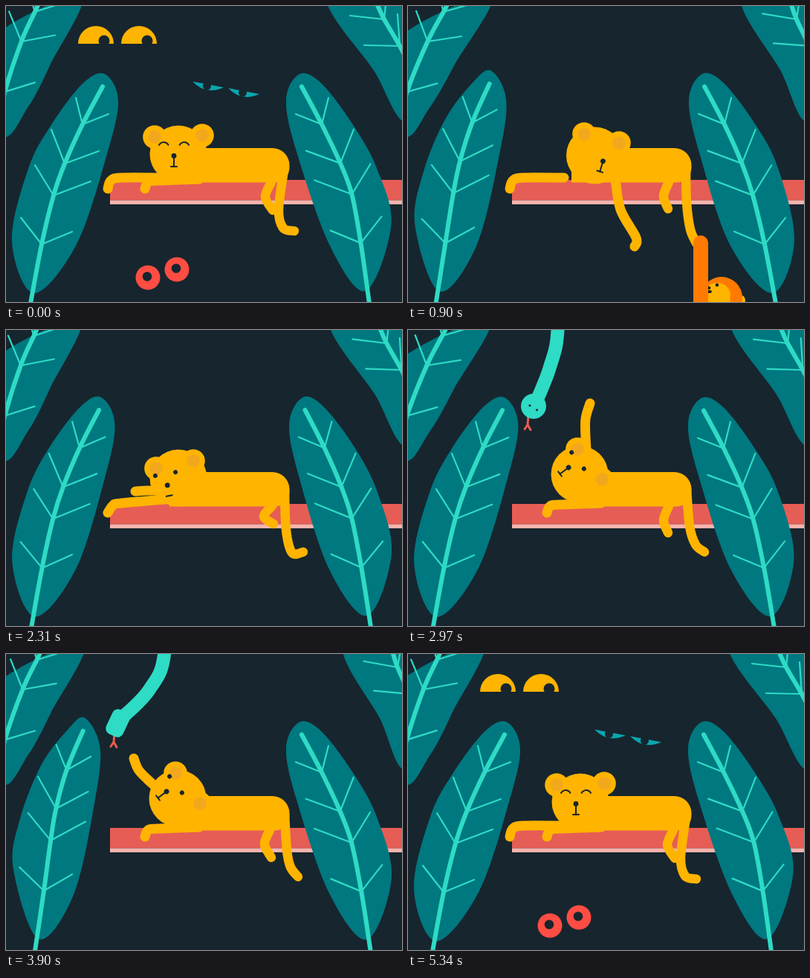
Recreate the animation shown at these times as an HTML page with a canvas. Size 533 px wide and 400 px high, loop 5370 ms.

```html
<!DOCTYPE html>
<html lang="en">
<head>
<meta charset="utf-8">
<title>Sleepy cat on a branch</title>
<style>
html, body { margin: 0; width: 100%; height: 100%; overflow: hidden; background: #17252e; }
canvas { display: block; }
</style>
</head>
<body>
<canvas id="stage" width="533" height="400"></canvas>
<script>
const g = document.getElementById('stage').getContext('2d');
const LOOP = 5370;
const BG = '#17252e', CAT = '#ffb400', EAR = '#f2a81d', LEAF = '#007880', VEIN = '#2edbc5',
  RED = '#e65d55', PALE = '#f8b3ae', EYE_RED = '#ff4d43', EYE_TEAL = '#0aa5ae', MONKEY = '#ff7a00';

// Numbers or arrays of the same form
const mix = (a, b, k) => Array.isArray(a) ? a.map((v, i) => mix(v, b[i], k)) : a + (b - a) * k;
const ease = k => k * k * (3 - 2 * k);

// keys: [[time, value], ...], eased between neighbours
function track(t, keys) {
  const i = keys.findIndex(k => k[0] > t);
  if (i < 0) return keys[keys.length - 1][1];
  if (!i) return keys[0][1];
  const [t0, a] = keys[i - 1], [t1, b] = keys[i];
  return mix(a, b, ease((t - t0) / (t1 - t0)));
}

// Smooth path through flat x, y points
function curve(p, closed) {
  const n = p.length / 2;
  const at = i => {
    const j = closed ? (i + n) % n : Math.min(n - 1, Math.max(0, i));
    return [p[2 * j], p[2 * j + 1]];
  };
  g.beginPath();
  g.moveTo(p[0], p[1]);
  for (let i = 0; i < (closed ? n : n - 1); i++) {
    const [a, b, c, d] = [at(i - 1), at(i), at(i + 1), at(i + 2)];
    g.bezierCurveTo(b[0] + (c[0] - a[0]) / 6, b[1] + (c[1] - a[1]) / 6,
      c[0] - (d[0] - b[0]) / 6, c[1] - (d[1] - b[1]) / 6, ...c);
  }
}
function stroke(color, width) {
  g.strokeStyle = color;
  g.lineWidth = width;
  g.stroke();
}
function fill(color) {
  g.fillStyle = color;
  g.fill();
}
function limb(p, color = CAT, width = 13) { curve(p); stroke(color, width); }
function line(color, width, ...p) {
  g.beginPath();
  for (let i = 0; i < p.length; i += 2) g.lineTo(p[i], p[i + 1]);
  stroke(color, width);
}
function dot(x, y, r, color, ry = r) {
  g.beginPath();
  g.ellipse(x, y, r, ry, 0, 0, 7);
  fill(color);
}
function within(x, y, deg, draw, sx = 1, sy = 1) {
  g.save();
  g.translate(x, y);
  g.rotate(deg * Math.PI / 180);
  g.scale(sx, sy);
  draw();
  g.restore();
}

// ---- Leaves: edge, rib, and a pair of veins at each inner rib point
const tall = {
  edge: [133,92, 151,128, 136,200, 95,322, 38,388, 8,318, 30,220, 60,162, 103,105],
  rib: [130,109, 103,160, 79,213, 64,256, 48,322, 33,402],
  veins: [[-9,-36, 35,-14], [-18,-46, 46,-17], [-25,-41, 50,-19], [-28,-36, 41,-17]]
};
const bent = {
  edge: [105,86, 126,126, 119,200, 91,325, 44,385, 10,290, 18,225, 47,150, 82,103],
  rib: [103,104, 81,157, 67,209, 60,252, 51,320, 39,402]
};
const topLeft = {
  edge: [90,-15, 56,80, 30,136, -5,174, -40,60],
  rib: [40,-18, 30,8, 15,48, -2,116, -8,150],
  veins: [[-10,-30, 36,-13], [-18,-40, 45,-10], [-18,-26, 40,-14]]
};
const topRight = {
  edge: [434,-18, 495,87, 545,155, 600,0],
  rib: [498,-6, 509,18, 530,54, 548,90],
  veins: [[3,-30, -46,-5], [-3,-43, -48,-1]]
};

function leaf(edge, rib, veins, turn) {
  curve(edge, true);
  fill(LEAF);
  veins.forEach(([lx, ly, rx, ry], i) =>
    within(rib[2 * i + 2], rib[2 * i + 3], turn, () => line(VEIN, 2.2, lx, ly, 0, 0, rx, ry)));
  limb(rib, VEIN, 6);
}

// The tip bends by `tip`, the foot by `foot`
function tallLeaf(tip, foot) {
  const bend = part => tall[part].map((v, i, p) => {
    const low = Math.min(1, Math.max(0, (p[i | 1] - 200) / 150));
    return mix(v, bent[part][i], mix(tip, foot, low));
  });
  leaf(bend('edge'), bend('rib'), tall.veins, -8 * tip);
}

// Hanging leaf, pushed sideways at the top of the stage and fixed at `still`
function topLeaf({ edge, rib, veins }, push, still) {
  const shear = p => p.map((v, i) => i % 2 ? v : v + push * Math.max(0, 1 - p[i + 1] / still));
  leaf(shear(edge), shear(rib), veins, push / 5);
}

function leaves(t) {
  const sway = (1 - Math.cos(4 * Math.PI * t / LOOP)) / 2;
  const hang = track(t, [[0, .5], [900, 1], [1710, 0], [2970, .9], [3900, .65], [4710, 1], [LOOP, .5]]);
  topLeaf(topLeft, 19 * hang, 120);
  topLeaf(topRight, 21 * sway, 145);
  tallLeaf(sway, sway);
  within(528, 0, 0, () => tallLeaf(
    track(t, [[0, 0], [900, .04], [1650, .97], [1800, .93], [2500, 0]]),
    track(t, [[0, 1], [900, 0], [1710, .9], [2970, .35], [3900, .7], [4710, 0], [LOOP, 1]])), -1);
}

// ---- Eyes in the dark
function watchers(t) {
  const open = track(t, [[300, 1], [450, 0], [4350, 0], [4550, 1]]);
  if (open < .01) return;
  const blink = (x, y, draw) => within(x, y, 0, draw, 1, open);
  for (const x of [121, 179]) blink(x, 51, () => {
    g.beginPath();
    g.arc(0, 0, 24, Math.PI, 0);
    fill(CAT);
    dot(11, -4, 7.5, BG);
  });
  for (const i of [0, 1]) blink(251 + 48 * i, 102 + 9 * i, () => {
    g.beginPath();
    g.moveTo(0, 0);
    g.lineTo(42, 8);
    g.quadraticCurveTo(18, 19, 0, 0);
    fill(EYE_TEAL);
    dot(19.5, 6, 5.5, BG);
  });
  for (const i of [0, 1]) blink(191 + 39 * i, 367 - 11 * i, () => {
    dot(0, 0, 16.5, EYE_RED);
    dot(-1, -1.5, 6.3, BG);
  });
}

// ---- Cat poses; face is [x, y, degrees] of the point between the eyes
const sleep = {
  head: [232, 200], face: [226, 187, 0], ears: [200, 177, 264, 175],
  armL: [210,232, 155,232, 141,236, 137,247],
  armR: [260,234, 203,236, 191,238, 187,247],
  leg: [357,238, 349,258, 359,276],
  tail: [375,215, 367,275, 373,300, 388,304]
};
const yawn = { ...sleep,
  leg: [351,238, 344,257, 350,274],
  tail: [375,215, 378,265, 386,294, 403,300]
};
const roll = { ...yawn,
  head: [251.5, 202], face: [267, 195, 17], ears: [237, 173, 284, 185],
  armR: [279,233, 286,275, 307,313, 305,325],
  tail: [374,215, 375,265, 380,302, 389,322]
};
const tug = { ...roll, tail: [374,215, 377,270, 383,312, 393,345] };
const wake = { ...sleep,
  face: [214.5, 194.5, -10], ears: [202, 187, 252, 177],
  armL: [225,228, 155,234, 144,237, 137,247],
  armR: [240,217, 210,217, 190,217, 174,218],
  leg: [358,238, 347,252, 360,262],
  tail: [375,215, 377,270, 385,301, 400,300]
};
const reach = { ...yawn,
  head: [231, 195], face: [228.5, 176.5, 53], ears: [228, 161, 261, 202],
  armL: [241,175, 239,145, 239,120, 245,99],
  tail: [375,215, 379,265, 387,290, 399,300]
};
const swat = { ...reach,
  armL: [210,187, 190,169, 178,156, 172,141],
  leg: [355,238, 348,257, 357,275],
  tail: [375,215, 378,265, 383,288, 393,301]
};
const acts = [[0, sleep], [350, sleep], [750, roll], [1000, roll], [1180, tug], [1500, wake], [2400, wake],
  [2800, reach], [3250, reach], [3650, swat], [3950, swat], [4450, yawn], [4850, yawn], [5310, sleep]];
const pose = (t, part) => track(t, acts.map(([at, p]) => [at, p[part]]));

function cat(t) {
  const ears = pose(t, 'ears');
  limb(pose(t, 'leg'), CAT, 12.5);
  limb(pose(t, 'tail'), CAT, 12.5);
  g.beginPath();
  g.roundRect(220, 192, 161.5, 46.5, [0, 23, 20, 0]);
  fill(CAT);
  limb(pose(t, 'armL'));
  dot(...pose(t, 'head'), 38.5, CAT);
  limb(pose(t, 'armR'));
  for (const i of [0, 2]) dot(ears[i], ears[i + 1], 15.8, CAT);
  for (const i of [0, 2]) dot(ears[i], ears[i + 1], 8.8, EAR);
  within(...pose(t, 'face'), () => face(t));
}

function face(t) {
  const gape = track(t, [[4350, 0], [4600, 1], [4850, 1], [5050, 0]]);
  const shut = t < 450 || t >= 4980;
  if (shut || t >= 1250) for (const x of [-13.8, 13.8]) {
    if (shut) {
      g.beginPath();
      g.arc(x, 4, 7, Math.PI * 1.15, Math.PI * 1.85);
      stroke(BG, 2);
    } else dot(x, 0, 3, BG);
  }
  dot(0, 15.5, 3.4, BG);
  g.globalAlpha = track(t, [[1250, 1], [1450, 0], [2450, 0], [2600, 1]]);
  line(BG, 2, 0, 16, 0, 30 - 5 * gape);
  g.globalAlpha = 1;
  if (gape > .05) dot(0, 30.5, 4 + 3 * gape, BG, 6 * gape);
  else line(BG, 2, -4, 30, 4, 30);
}

// ---- Visitors
function monkey(t) {
  const y = track(t, [[560, 100], [870, 0], [1000, 0], [1180, 24], [1480, 110]]);
  if (y >= 100) return;
  within(0, y, 0, () => {
    dot(446, 398, 8, CAT);
    dot(422, 394, 28, MONKEY);
    dot(416, 391, 18, CAT, 17);
    dot(414, 400, 20, CAT, 15);
    dot(416, 377, 2.3, BG);
    dot(405, 381, 2.3, BG);
    dot(405, 386, 4, BG, 2);
    line(MONKEY, 20, 394, 320, 394, 520);
  });
}

function snake(t) {
  // body, head [x, y, length, width, corner, eye opacity], tongue root
  const front = [[202,-8, 191,50, 170,103], [169, 103, 34, 34, 17, 1], [162, 119]];
  const side = [[214,-8, 193,48, 152,90], [150.5, 93.5, 36, 25, 8, 0], [146, 110]];
  const [body, [x, y, w, h, r, eyes], [tx, ty]] = track(t, [[3250, front], [3650, side]]);
  const lift = track(t, [[2350, -150], [2850, 0], [3950, 0], [4300, -150]]);
  if (lift <= -149) return;
  within(0, lift, 0, () => {
    line(RED, 3, tx, ty - 4, tx - 1, ty + 9, tx - 5, ty + 15);
    line(RED, 3, tx - 1, ty + 9, tx + 3, ty + 16);
    limb([body[0], -170, ...body], VEIN, 18);
    within(x, y, 115, () => {
      g.beginPath();
      g.roundRect(-w / 2, -h / 2, w, h, r);
      fill(VEIN);
    });
    g.globalAlpha = eyes;
    dot(x - 5, y - 1, 1.6, BG);
    dot(x + 4.5, y + 5, 1.6, BG);
    g.globalAlpha = 1;
  });
}

function draw(t) {
  g.fillStyle = BG;
  g.fillRect(0, 0, 533, 400);
  g.lineCap = g.lineJoin = 'round';
  watchers(t);
  g.fillStyle = RED;
  g.fillRect(140, 235, 393, 27.5);
  g.fillStyle = PALE;
  g.fillRect(140, 262.5, 393, 5.5);
  snake(t);
  cat(t);
  monkey(t);
  leaves(t);
}

const start = performance.now();
function tick() {
  draw((performance.now() - start) % LOOP);
  requestAnimationFrame(tick);
}
tick();
</script>
</body>
</html>
```
